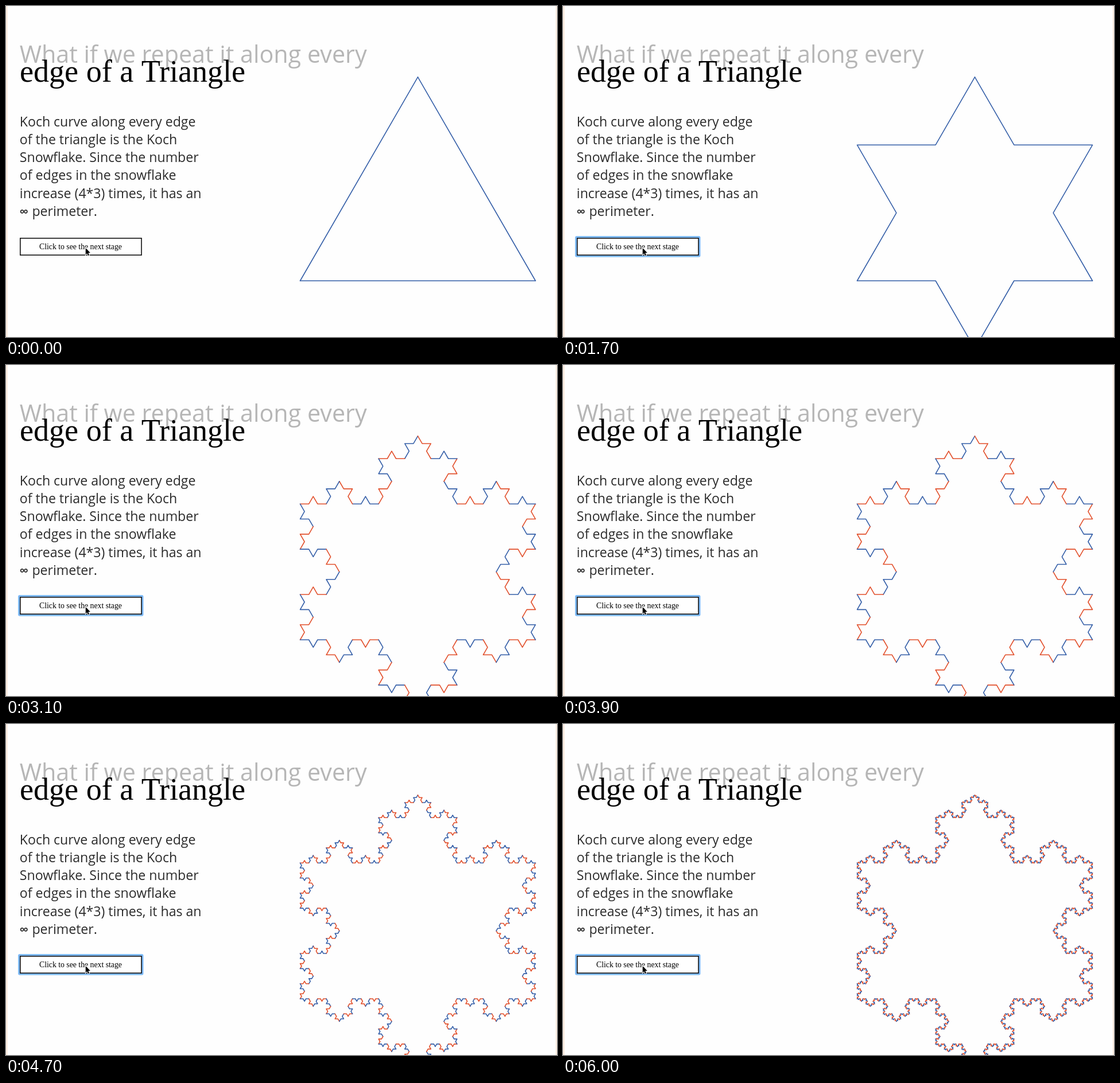
Write an HTML page with a canvas that moves like this. It is 960x577 px and loops after 6.1 s.

```html
<!DOCTYPE html>
<html lang="en">
<head>
<meta charset="utf-8">
<title>Koch snowflake</title>
<style>
  html, body { margin: 0; width: 100%; height: 100%; overflow: hidden; background: #fefefe; }
  canvas { display: block; }
</style>
</head>
<body>
<canvas id="stage" width="960" height="577"></canvas>
<script>
const ctx = document.getElementById('stage').getContext('2d');

const LOOP = 6100;
const FOCUS_AT = 1100;
const CLICKS = [1200, 2200, 3100, 4100, 5500];
const BLUE = '#355fa8', RED = '#e2502c';
const SANS = '"Open Sans", sans-serif';
const SERIF = '"Liberation Serif", serif';

const TOP = [717.5, 123.8], LEFT = [512.5, 479], RIGHT = [922.5, 479];
const SIDES = [[TOP, LEFT], [LEFT, RIGHT], [RIGHT, TOP]];

const PARAGRAPH = [
  'Koch curve along every edge',
  'of the triangle is the Koch',
  'Snowflake. Since the number',
  'of edges in the snowflake',
  'increase (4*3) times, it has an'
];

// Points of a Koch curve, each edge bulging to the outside.
function koch(points, depth) {
  if (!depth) return points;
  const next = [points[0]];
  for (let i = 1; i < points.length; i++) {
    const [ax, ay] = points[i - 1], [bx, by] = points[i];
    const dx = bx - ax, dy = by - ay, h = Math.sqrt(3) / 6;
    next.push(
      [ax + dx / 3, ay + dy / 3],
      [ax + dx / 2 - dy * h, ay + dy / 2 + dx * h],
      [ax + dx * 2 / 3, ay + dy * 2 / 3],
      [bx, by]
    );
  }
  return koch(next, depth - 1);
}

const stages = [0, 1, 2, 3, 4, 5].map(depth => SIDES.map(side => koch(side, depth)));

function polyline(points) {
  ctx.beginPath();
  points.forEach(([x, y]) => ctx.lineTo(x, y));
}

// Every group of four segments shares a colour; groups alternate.
function drawSnowflake(stage) {
  ctx.lineWidth = 1.6;
  ctx.lineCap = ctx.lineJoin = 'round';
  for (const points of stages[stage]) {
    for (let i = 0; i < points.length - 1; i += 4) {
      polyline(points.slice(i, i + 5));
      ctx.strokeStyle = i / 4 % 2 ? RED : BLUE;
      ctx.stroke();
    }
  }
}

function text(string, x, y, font, color) {
  ctx.font = font;
  ctx.fillStyle = color;
  ctx.fillText(string, x, y);
}

function drawText() {
  text('What if we repeat it along every', 23.7, 99, `41.25px ${SANS}`, '#b6b6b6');
  text('edge of a Triangle', 24, 131.7, `54.1px ${SERIF}`, '#000');
  const body = `23.1px ${SANS}`;
  PARAGRAPH.forEach((line, i) => text(line, 23.8, 209.7 + i * 31.2, body, '#2b2b2b'));
  text('∞', 23.6, 365.7, `600 22px ${SANS}`, '#2b2b2b');
  text('perimeter.', 45.4, 365.7, body, '#2b2b2b');
}

function drawButton(focused) {
  if (focused) {
    ctx.fillStyle = '#7ebaf8';
    ctx.beginPath();
    ctx.roundRect(21, 401, 218.5, 36.7, 3);
    ctx.fill();
  }
  ctx.fillStyle = '#111';
  ctx.fillRect(24, 404, 212.8, 31);
  ctx.fillStyle = '#fff';
  ctx.fillRect(25.6, 405.6, 209.6, 27.8);
  text('Click to see the next stage', 58, 424, `13.75px ${SERIF}`, '#000');
}

function drawPointer() {
  polyline([[138.7, 421.8], [138.7, 433.6], [141.3, 431.2], [143.2, 435.3],
            [145.1, 434.4], [143.3, 430.5], [146.9, 430.2]]);
  ctx.closePath();
  ctx.lineJoin = 'miter';
  ctx.lineWidth = 1.6;
  ctx.strokeStyle = '#fff';
  ctx.stroke();
  ctx.fillStyle = '#000';
  ctx.fill();
}

function draw(time) {
  ctx.fillStyle = '#fefefe';
  ctx.fillRect(0, 0, 960, 577);
  ctx.fillStyle = '#fcefe4';
  ctx.fillRect(0, 0, 3, 577);
  ctx.fillRect(957.5, 0, 2.5, 577);
  drawText();
  drawSnowflake(CLICKS.filter(click => time >= click).length);
  drawButton(time >= FOCUS_AT);
  drawPointer();
}

const start = performance.now();
function tick() {
  draw((performance.now() - start) % LOOP);
  requestAnimationFrame(tick);
}
tick();
</script>
</body>
</html>
```
